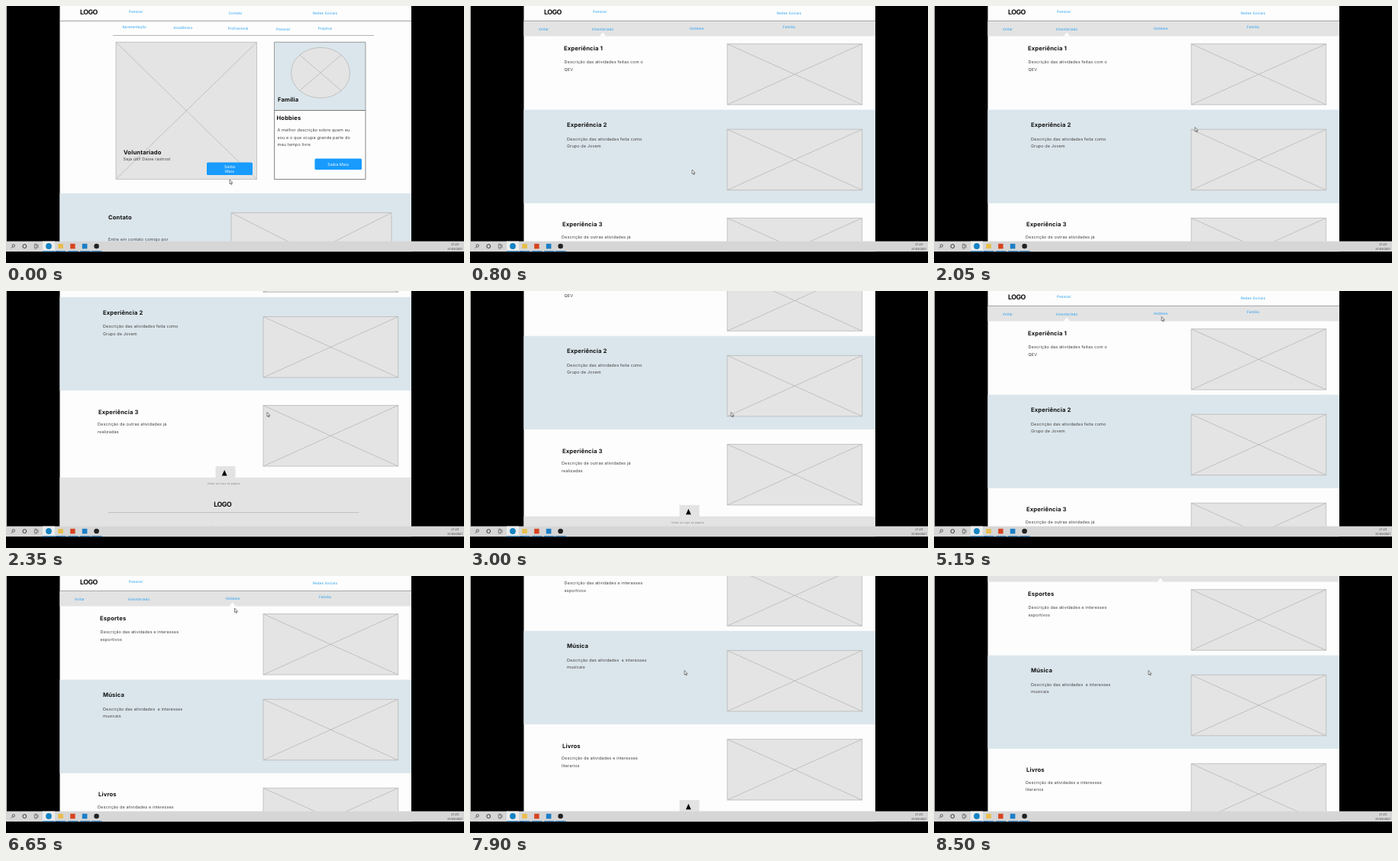
An HTML page that plays this animation: 600 px wide and 336 px high, repeating every 8550 ms.

```html
<!DOCTYPE html>
<html lang="pt">
<head>
<meta charset="utf-8">
<style>
  html, body { margin: 0; width: 100%; height: 100%; overflow: hidden; background: #000; }
  svg { display: block; width: 600px; height: 336px; }
  text { font: 400 5.5px Inter, "Open Sans", sans-serif; letter-spacing: .12px; fill: #444; white-space: pre; text-rendering: geometricPrecision; }
  .title { font-size: 7.6px; font-weight: 700; letter-spacing: .16px; fill: #111; }
  .link { font-size: 4.6px; fill: #1f9cf2; text-anchor: middle; }
  .button { font-size: 5.2px; fill: #fff; text-anchor: middle; }
  .logo { font-size: 8.8px; font-weight: 700; letter-spacing: -.5px; fill: #111; }
  .small { font-size: 3.6px; letter-spacing: .07px; fill: #888; text-anchor: middle; }
  .clock { font: 400 4px "Open Sans", sans-serif; letter-spacing: -.1px; fill: #333; text-anchor: end; }
</style>
</head>
<body>
<svg id="stage" viewBox="0 0 600 336"></svg>
<script>
const DURATION = 8550, TICK = 31.9;
const GREY = '#e3e3e3', BAND = '#dbe6ec', BLUE = '#189bfd', PAPER = '#fdfdfd', EDGE = '#b0b0b0';

const rect = (x, y, w, h, fill, extra = '') =>
  `<rect x="${x}" y="${y}" width="${w}" height="${h}" fill="${fill}" ${extra}/>`;
const path = (d, stroke, fill = 'none', width = .7) =>
  `<path d="${d}" stroke="${stroke}" fill="${fill}" stroke-width="${width}"/>`;
const circle = (x, y, r, fill, extra = '') =>
  `<circle cx="${x}" cy="${y}" r="${r}" fill="${fill}" ${extra}/>`;
const text = (x, y, s, cls = '') => `<text x="${x}" y="${y}" class="${cls}">${s}</text>`;
const lines = (x, y, rows) => rows.map((s, i) => text(x, y + i * 9.6, s)).join('');
const links = list => list.map(([x, y, s]) => text(x, y + 1.6, s, 'link')).join('');

const box = (x, y, w, h) =>
  path(`M${x} ${y}h${w}v${h}h${-w}zl${w} ${h}m0 ${-h}l${-w} ${h}`, EDGE, '#e4e4e4');
const button = (x, y, w, h) => rect(x, y, w, h, BLUE, 'rx="1.6"');

const header = rect(70.5, 0, 460.5, 500, PAPER) + text(97, 11.4, 'LOGO', 'logo') +
  path('M70.5 19.6H531', '#777') + links([[170, 7, 'Pessoal'], [418, 9.5, 'Redes Sociais']]);

const home = header +
  links([[300.5, 9.5, 'Contato'], [168, 27, 'Apresentação'], [232, 28.5, 'Acadêmico'],
    [304, 29, 'Profissional'], [363, 30, 'Pessoal'], [418, 29, 'Projetos']]) +
  path('M140 38.5H482', '#999') +
  box(144, 47.3, 184.5, 179.2) +
  text(154, 194, 'Voluntariado', 'title') + text(153.5, 202, 'Seja útil! Deixe rastros!') +
  button(263, 204.5, 60, 16.5) + text(293, 211.6, 'Saiba', 'button') + text(293, 218.2, 'Mais', 'button') +
  path('M351.5 47.3h119.5v89.2h-119.5z', '#777', BAND) +
  path('M351.5 136.5h119.5v90h-119.5z', '#555', PAPER) +
  `<ellipse cx="412" cy="87.3" rx="38.5" ry="33" fill="#e4e4e4" stroke="${EDGE}" stroke-width=".7"/>` +
  path('M384.8 64l54.4 46.6m0-46.6l-54.4 46.6', EDGE) +
  text(356, 124.9, 'Família', 'title') + text(354.5, 148.8, 'Hobbies', 'title') +
  lines(355.5, 164, ['A melhor descrição sobre quem eu', 'sou e o que ocupa grande parte do', 'meu tempo livre']) +
  button(404.5, 199.5, 61.5, 14.5) + text(435.2, 208.7, 'Saiba Mais', 'button') +
  rect(70.5, 245, 460.5, 150, BAND) +
  text(134, 279, 'Contato', 'title') + text(134, 306.5, 'Entre em contato comigo por') +
  box(295, 270.3, 210, 106);

const footer = rect(70.5, 371.5, 460.5, 130, GREY) + rect(274.5, 356.7, 26, 15, GREY) +
  path('M286.2 361.6l3.4 7.4h-6.8z', 'none', '#000') +
  text(285, 381, 'Voltar ao topo da página', 'small') + text(272.3, 409.2, 'LOGO', 'logo') +
  path('M134 417.2H462.5', EDGE) + text(285, 437.5, 'Todos os direitos', 'small');

// Sub page: a grey menu with a marker under the active link, then three sections.
const subPage = (marker, sections) => header +
  rect(70.5, 20, 460.5, 19.5, GREY) + path(`M${marker - 4.2} 39.6l4.2-5 4.2 5z`, 'none', PAPER) +
  links([[96.5, 30.5, 'Voltar'], [174, 30.5, 'Voluntariado'], [297, 29.5, 'Hobbies'], [418, 27.5, 'Família']]) +
  rect(70.5, 135.6, 460.5, 122.2, BAND) +
  sections.map(([name, ...rows], i) => {
    const [tx, ty, dx, dy, by] = [[123, 58.3, 123.5, 75.3, 49.6], [127, 158.2, 127, 175.6, 161.2], [121, 288.4, 120, 303.8, 277.2]][i];
    return text(tx, ty, name, 'title') + lines(dx, dy, rows) + box(337, by, 176.7, 79.5);
  }).join('') + footer;

const volunteer = subPage(174, [
  ['Experiência 1', 'Descrição das atividades feitas com o', 'QEV'],
  ['Experiência 2', 'Descrição das atividades feita como', 'Grupo de Jovem'],
  ['Experiência 3', 'Descrição de outras atividades já', 'realizadas']]);
const hobbies = subPage(296.7, [
  ['Esportes', 'Descrição das atividades e interesses', 'esportivos'],
  ['Música', 'Descrição das atividades  e interesses', 'musicais'],
  ['Livros', 'Descrição de atividades e interesses', 'literarios']]);

const taskbar = rect(0, 307.6, 600, 13.6, '#d6d6d6') + rect(0, 321.2, 600, 14.8, '#000') +
  rect(48, 307.6, 16, 13.6, '#ececec') +
  circle(9.8, 313.4, 1.7, 'none', 'stroke="#333" stroke-width=".7"') + path('M8.6 314.7l-2 2', '#333') +
  circle(24.3, 314.1, 2.4, 'none', 'stroke="#222" stroke-width=".9"') +
  path('M37.3 312.4h3.4v3.4h-3.4zM42 312v4.2M37.3 311.2h3.4M37.3 317h3.4', '#444', 'none', .6) +
  circle(56, 314, 3.9, '#1683c4') + rect(68.3, 311, 6.6, 6, '#e9bd4b') +
  rect(84.2, 310.8, 6.4, 6.6, '#d6431f') + rect(99.8, 310.8, 6.6, 6.6, '#1b7fc8') +
  circle(118.6, 314, 3.3, '#222') +
  [48, 65, 81, 97, 112].map(x => rect(x, 320.2, x === 48 ? 16 : 13.5, 1, '#1a78c2')).join('') +
  text(593, 312.6, '21:23', 'clock') + text(598.5, 318.8, '31/03/2021', 'clock');

const stage = document.getElementById('stage');
stage.innerHTML = rect(0, 0, 600, 336, '#000') + rect(0, 0, 1, 308, '#c8c8c8') +
  [home, volunteer, hobbies].map(p => `<g class="page">${p}</g>`).join('') + taskbar +
  '<g id="cursor">' + path('M0 0v5.6l1.3-1.1.9 2 .9-.4-.9-1.9h1.7z', '#333', '#fff', .6) + '</g>';

const pages = [...stage.querySelectorAll('.page')];
const cursor = document.getElementById('cursor');

// Keys are [time, ...values]; each stretch eases in and out.
const cursorKeys = [[0, 293, 227], [50, 293, 227], [350, 291, 214], [1050, 291, 214], [1800, 342, 158.5],
  [3250, 342, 158.5], [3600, 303, 123], [3800, 303, 123], [5300, 298, 31], [6100, 298, 31],
  [6500, 299.5, 42], [6700, 299.5, 42], [7200, 281, 123.5]];
const scrollKeys = [[0, 0], [2080, 0], [2320, 4], [2850, 4], [3200, 0], [7300, 0], [7550, 4],
  [7700, 4], [7890, 2], [8350, 2], [8490, 1]];

function sample(keys, t) {
  const i = keys.findIndex(k => k[0] > t);
  if (i < 0) return keys[keys.length - 1].slice(1);
  const [a, b] = [keys[i - 1], keys[i]];
  const u = (t - a[0]) / (b[0] - a[0]), e = u * u * (3 - 2 * u);
  return a.slice(1).map((v, n) => v + (b[n + 1] - v) * e);
}

function draw() {
  const t = performance.now() % DURATION;
  const current = t < 500 ? 0 : t < 5850 ? 1 : 2;
  const [ticks] = sample(scrollKeys, t);
  pages.forEach((p, i) => {
    p.style.display = i === current ? '' : 'none';
    p.setAttribute('transform', `translate(0 ${-ticks * TICK})`);
  });
  cursor.setAttribute('transform', `translate(${sample(cursorKeys, t).join(' ')})`);
  requestAnimationFrame(draw);
}
draw();
</script>
</body>
</html>
```
